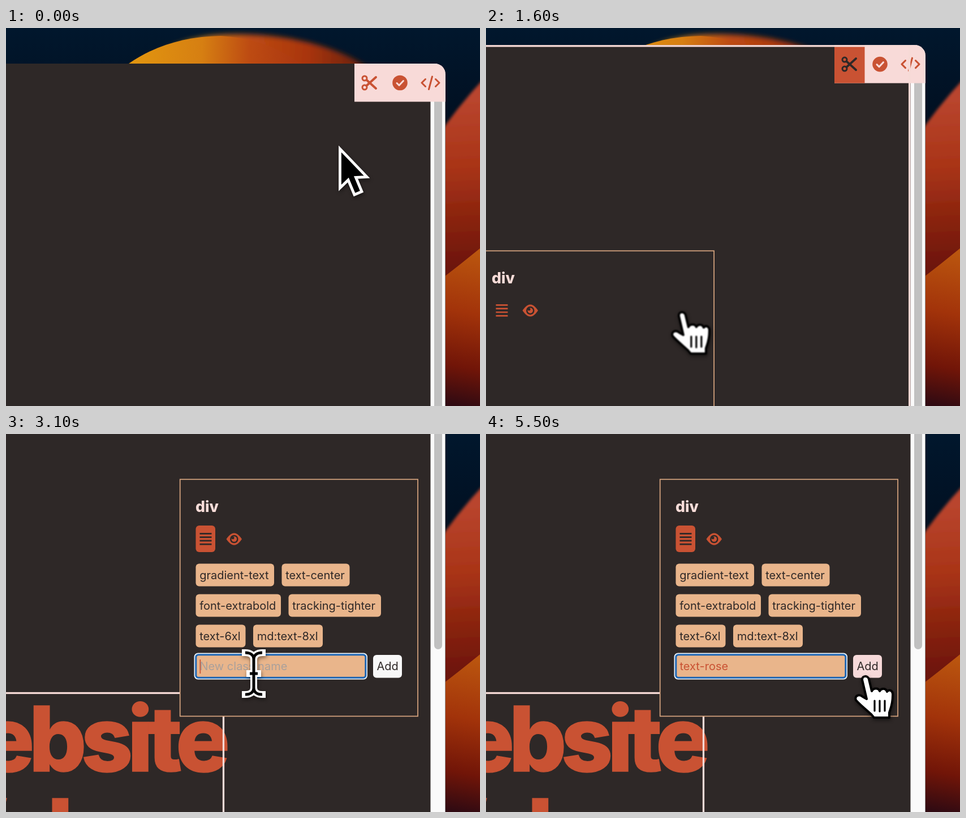
An HTML page for the animation above (5600 ms loop, 838x669 px).

```html
<!DOCTYPE html>
<html lang="en">
<head>
<meta charset="utf-8">
<title>Class editor demo</title>
<style>
  html, body { margin: 0; width: 100%; height: 100%; overflow: hidden; background: #01152a; }
  svg { display: block; width: 100%; height: 100%; }
  text { font: 20px Inter, sans-serif; fill: #2e2827; white-space: pre; }
  .title { font-size: 26.7px; font-weight: 800; fill: #f8dcd8; }
  .heading {
    font-size: 160px; font-weight: 800; letter-spacing: -.061em; text-anchor: end;
    fill: #c95233; stroke: #c95233; stroke-width: 1.5;
  }
  .rust { fill: #c95233; }
  .dark { fill: #2e2827; }
  .line { fill: none; stroke: #c95233; stroke-width: 3; stroke-linecap: round; stroke-linejoin: round; }
  .outline { fill: none; stroke: #f6dad6; stroke-width: 3.3; }
</style>
</head>
<body>
<svg viewBox="0 0 838 669" preserveAspectRatio="none">
  <defs>
    <linearGradient id="dome" gradientUnits="userSpaceOnUse" x1="220" y1="45" x2="640" y2="60">
      <stop offset="0" stop-color="#e2960f"/>
      <stop offset=".3" stop-color="#d67f12"/>
      <stop offset=".5" stop-color="#bd4b12"/>
      <stop offset=".75" stop-color="#a83410"/>
      <stop offset="1" stop-color="#63200f"/>
    </linearGradient>
    <linearGradient id="upper" gradientUnits="userSpaceOnUse" x1="800" y1="125" x2="815" y2="425">
      <stop offset="0" stop-color="#b9452e"/>
      <stop offset=".4" stop-color="#a93417"/>
      <stop offset="1" stop-color="#6c1407"/>
    </linearGradient>
    <linearGradient id="lower" gradientUnits="userSpaceOnUse" x1="830" y1="395" x2="780" y2="665">
      <stop offset="0" stop-color="#bb560f"/>
      <stop offset=".4" stop-color="#a2330a"/>
      <stop offset=".75" stop-color="#711508"/>
      <stop offset="1" stop-color="#300a12"/>
    </linearGradient>
    <linearGradient id="sky" x1="0" y1="0" x2="0" y2="1">
      <stop offset="0" stop-color="#01172d"/>
      <stop offset="1" stop-color="#010f20"/>
    </linearGradient>
    <filter id="soft" x="-20%" y="-40%" width="140%" height="180%"><feGaussianBlur stdDeviation="5"/></filter>
    <filter id="edge" x="-20%" y="-20%" width="140%" height="140%"><feGaussianBlur stdDeviation="2.5"/></filter>
    <clipPath id="frame"><rect x="-60" width="837" height="1300" rx="19"/></clipPath>
  </defs>

  <!-- wallpaper -->
  <rect width="838" height="669" fill="#01152a"/>
  <rect width="838" height="180" fill="url(#sky)"/>
  <path d="M270 80 V45 C310 22 350 11 410 11 C500 11 585 32 640 70 V80Z" fill="url(#dome)" filter="url(#soft)"/>
  <path d="M217 63 C262 31 318 15 380 14 C430 17 480 32 520 63Z" fill="url(#dome)"/>
  <path d="M740 226 Q790 147 850 84 V700 H740Z" fill="url(#upper)" filter="url(#edge)"/>
  <path d="M770 444 Q805 417 838 390 V669 H770Z" fill="url(#lower)"/>

  <g id="window"><g clip-path="url(#frame)">
    <rect x="-60" width="837" height="1300" class="dark"/>
    <rect x="750.5" width="26" height="1300" fill="#fafafa"/>
    <rect x="757" y="-20" width="14" height="685" rx="7" fill="#c0c0c0"/>

    <g transform="translate(0 -63)">
      <rect x="616" y="63" width="161" height="67.5" fill="#f8dad8"/>
      <rect id="cutButton" x="616" y="63" width="53.5" height="67.5" class="rust"/>
      <g id="scissors" class="line">
        <circle cx="634" cy="89" r="4"/><circle cx="634" cy="105" r="4"/>
        <path d="M637.5 92 L654 107 M637.5 102 L654 87" style="stroke-width:4"/>
      </g>
      <circle cx="696.5" cy="97" r="13.3" class="rust"/>
      <path class="line" style="stroke:#f8dad8" d="M691 97.5 L695 101.5 L702.5 93.5"/>
      <path class="line" d="M741.5 90.5 L735 97 L741.5 103.5 M753.5 86 L747.5 108.5 M759.5 90.5 L766 97 L759.5 103.5"/>
    </g>
    <rect id="bodyOutline" class="outline" x="-70" y="1.7" width="818.7" height="1400"/>

    <g transform="translate(0 284)">
      <text class="heading" x="386.4" y="597.4">Website</text>
      <text class="heading" x="165.6" y="761">Web</text>
      <rect id="headingOutline" class="outline" x="-70" y="458.5" width="454.5" height="500"/>
    </g>

    <g id="panel">
      <rect x="307.7" y="80.3" width="420.4" height="419.2" class="dark" stroke="#d9a680" stroke-width="1.7"/>
      <text class="title" x="335" y="138">div</text>
      <rect id="listButton" x="335.5" y="162" width="34.5" height="47" rx="6" class="rust"/>
      <path id="listIcon" stroke-width="2.7" d="M342.5 176.3 h21 m-21 6.3 h21 m-21 6.3 h21 m-21 6.3 h21"/>
      <path class="rust" d="M389.5 186 C395 178 399 175.5 403.3 175.5 S411.5 178 417 186 C411.5 194 407.5 196.5 403.3 196.5 S395 194 389.5 186Z"/>
      <circle class="dark" cx="403.3" cy="186" r="7.3"/>
      <circle class="rust" cx="403.3" cy="186" r="4.8"/>
      <circle class="dark" cx="401" cy="183.7" r="2.5"/>
      <g id="editor">
        <g id="chips"></g>
        <rect x="332.5" y="387.5" width="306.5" height="47" rx="7" fill="#e9f1f8"/>
        <rect x="334.3" y="389.3" width="303" height="43.4" rx="5.5" fill="#1d66b4"/>
        <rect x="337.3" y="392.3" width="297" height="37.4" rx="3" fill="#e9b58b"/>
        <text id="field" x="342.5" y="418"></text>
        <rect id="caret" y="399" width="1.7" height="25" class="rust"/>
        <rect id="addButton" x="649" y="391" width="51" height="40.5" rx="6"/>
        <text x="655.5" y="418">Add</text>
      </g>
    </g>
  </g></g>

  <g id="cursor">
    <path id="arrow" d="M2.5 6 V75 L17 61 L28 87 L41 81.5 L30.5 56.5 L50 55.5Z"
      fill="#000" stroke="#fff" stroke-width="4.8"/>
    <g id="hand" stroke="#000" stroke-linecap="round" stroke-linejoin="round">
      <path fill="#fff" stroke-width="4" d="M-6 6 C-6 -2 4 -2 6 5 L11 26 C14 20 23 20 25 26 C28 20 36 21 38 27
        C42 22 49 25 48 34 C48 50 44 57 42 64 V73 H15 L10 67 C0 58 -10 50 -17 42 C-20 35 -12 30 -5 36 L2 40Z"/>
      <path fill="none" stroke-width="3.2" d="M16 43 V61 M25 43 V62 M34 43 V61"/>
    </g>
    <g id="beam" fill="none">
      <path id="beamShape" stroke="#fff" stroke-width="12" stroke-linecap="square"
        d="M-15 -37 C-6 -37 0 -33 0 -25 V25 C0 33 -6 37 -15 37 M15 -37 C6 -37 0 -33 0 -25 M15 37 C6 37 0 33 0 25 M-7 0 H7"/>
    </g>
  </g>
</svg>

<script>
const LOOP = 5600, STEP = 100;
const $ = id => document.getElementById(id);
const show = (id, on) => { $(id).style.display = on ? '' : 'none'; };
const move = (id, x, y) => $(id).setAttribute('transform', `translate(${x} ${y})`);
const clamp = v => Math.min(1, Math.max(0, v));
const smooth = p => p * p * (3 - 2 * p);

// The black core of the text cursor reuses its outline geometry.
const ink = $('beamShape').cloneNode();
ink.removeAttribute('id');
ink.setAttribute('stroke', '#000');
ink.setAttribute('stroke-width', 5);
ink.setAttribute('stroke-linecap', 'butt');
$('beam').append(ink);

const chips = [
  [335.5, 229.5, 138.5, 'gradient-text'], [487.5, 229.5, 120, 'text-center'],
  [335.5, 283.5, 150.5, 'font-extrabold'], [499.5, 283.5, 163.5, 'tracking-tighter'],
  [335.5, 337.5, 88, 'text-6xl'], [437, 337.5, 123, 'md:text-8xl']
];
$('chips').innerHTML = chips.map(([x, y, w, label]) =>
  `<rect x="${x}" y="${y}" width="${w}" height="40" rx="6" fill="#e9b58b"/>
   <text x="${x + 6.7}" y="${y + 27}">${label}</text>`).join('');

// Cursor stops: time, x, y
const path = [
  [0, 588, 208], [600, 634, 97], [1000, 634, 97], [1700, 330, 527], [1900, 330, 527],
  [2300, 330, 485], [2400, 330, 485], [2650, 352, 188], [2750, 352, 188], [3000, 438, 424],
  [4100, 438, 424], [4200, 438, 439], [5150, 671, 429], [LOOP, 671, 429]
];
// Cursor shapes: start time, id
const shapes = [
  [0, 'arrow'], [500, 'hand'], [1700, 'beam'], [2200, ''], [2400, 'arrow'], [2600, 'hand'],
  [3000, 'beam'], [3400, ''], [4200, 'arrow'], [5000, 'hand']
];

function cursorAt(t) {
  const i = path.findIndex(([end]) => t < end);
  const [t0, x0, y0] = path[i - 1], [t1, x1, y1] = path[i];
  const p = smooth((t - t0) / (t1 - t0));
  return [x0 + (x1 - x0) * p, y0 + (y1 - y0) * p];
}

// Critically damped glide from the resting place to the scrolled one
function windowTop(t) {
  const s = Math.max(0, t - 1550) * 0.0103;
  return -284 + 347 * (1 + s) * Math.exp(-s);
}

const WORD = 'text-rose', TYPE_START = 3400, TYPE_END = 4000;

function draw(t) {
  move('window', 0, windowTop(t));

  const cutting = t >= 900, picked = t >= 1700, open = t >= 2700;
  show('cutButton', cutting);
  $('scissors').style.stroke = cutting ? '#2e2827' : '#c95233';
  show('bodyOutline', t >= 1200 && !picked);
  show('headingOutline', picked);

  show('panel', t >= 1200);
  move('panel', picked ? 0 : -325, 284);
  show('listButton', open);
  $('listIcon').style.stroke = open ? '#2e2827' : '#c95233';
  show('editor', open);

  const progress = clamp((t - TYPE_START) / (TYPE_END - TYPE_START));
  const typed = t < TYPE_START ? '' : WORD.slice(0, 1 + Math.floor(progress * (WORD.length - 1)));
  const field = $('field');
  field.textContent = typed || 'New class name';
  field.style.fill = typed ? '#c95233' : '#aaa09b';
  $('addButton').style.fill = typed ? '#f6d9d9' : '#f8f8f8';
  $('caret').setAttribute('x', 342.5 + (typed ? field.getComputedTextLength() : 0));
  show('caret', t < TYPE_END || Math.floor((t - TYPE_END) / 500) % 2 === 0);

  const shape = shapes.filter(([start]) => start <= t).pop()[1];
  for (const id of ['arrow', 'hand', 'beam']) show(id, id === shape);
  const [x, y] = cursorAt(t), [px, py] = cursorAt(Math.max(0, t - STEP / 2));
  const blur = Math.min(1.6, Math.hypot(x - px, y - py) / 27);
  move('cursor', x, y);
  $('cursor').style.filter = `blur(${blur}px) drop-shadow(1px 3px 3px rgba(0,0,0,.45))`;
}

function tick() {
  draw(Math.floor(performance.now() % LOOP / STEP) * STEP);
  requestAnimationFrame(tick);
}
tick();
</script>
</body>
</html>
```
